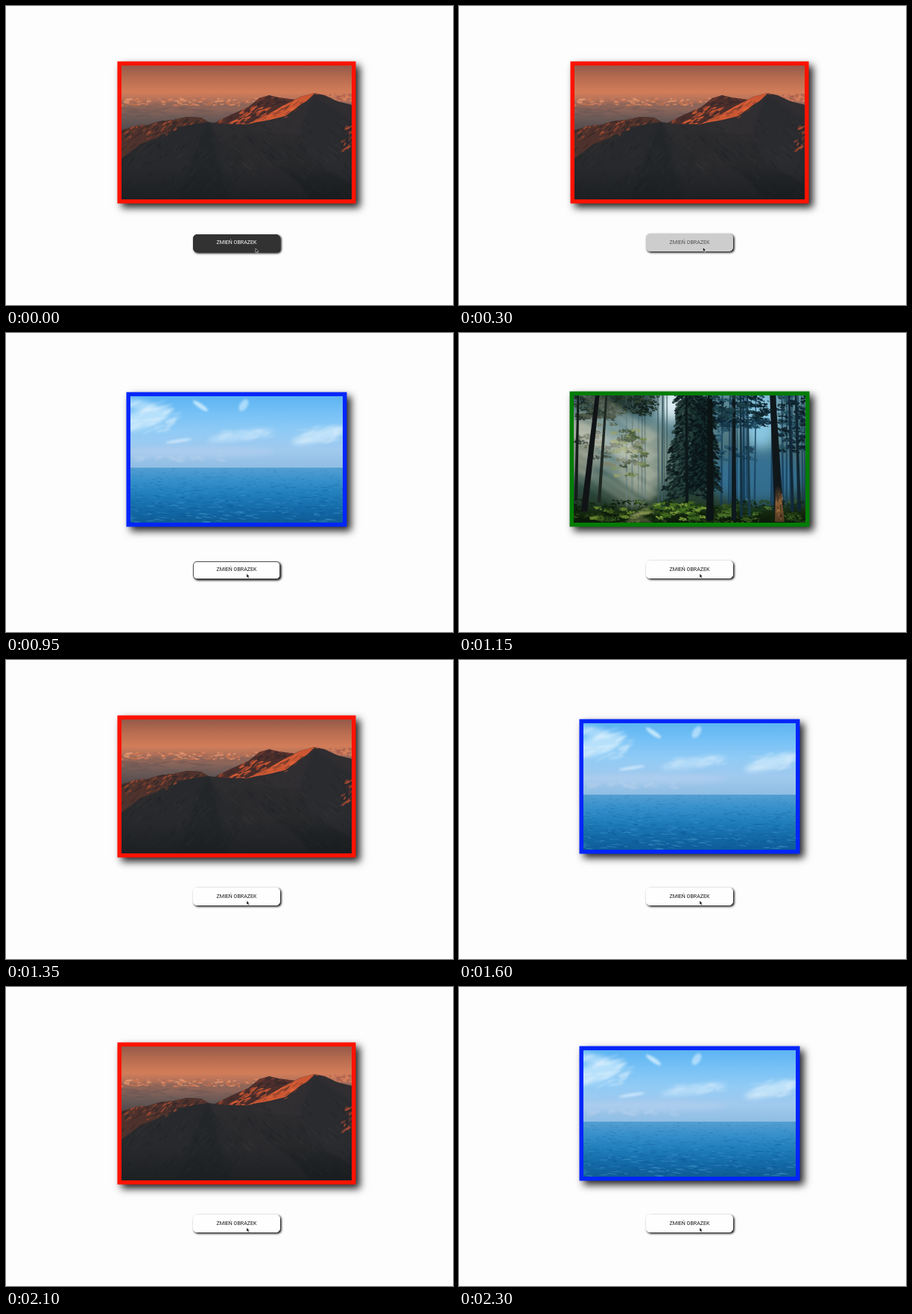
An HTML page with a canvas for the animation above (2.35 s loop, 600 by 402 pixels).

```html
<!DOCTYPE html>
<html lang="pl">
<head>
<meta charset="utf-8">
<title>Zmień obrazek</title>
<style>
html, body { margin: 0; width: 100%; height: 100%; overflow: hidden; background: #fefdfe; }
canvas { position: absolute; visibility: hidden; box-shadow: 0 0 0 5.5px, 5px 5px 10px 5.5px #000d; }
#red { left: 155px; top: 80px; color: #fe1300; }
#blue { left: 167px; top: 85px; color: #0326fa; }
#green { left: 154px; top: 84px; color: #047c07; }
#button {
  position: absolute; box-sizing: border-box; left: 251px; width: 117px; height: 24px;
  border: 1px solid; border-radius: 5px; box-shadow: 1.5px 1.5px 3px #000;
}
#label {
  position: absolute; left: 209.5px; top: 311px; width: 200px; text-align: center;
  font: 7.05px/14px Roboto, Arial, sans-serif;
}
#cursor { position: absolute; left: 0; top: 0; }
</style>
</head>
<body>
<canvas id="red" width="309" height="180"></canvas>
<canvas id="blue" width="285" height="170"></canvas>
<canvas id="green" width="311" height="171"></canvas>
<div id="button"></div>
<div id="label">ZMIEŃ OBRAZEK</div>
<svg id="cursor" width="8" height="10" viewBox="-1 -1 8 10">
  <path d="M0 0V5.6L1.3 4.5L2.3 6.7L3.3 6.2L2.3 4.1H4Z" fill="#111" stroke="#fff" stroke-width=".5"/>
</svg>
<script>
const el = id => document.getElementById(id);
let c, seed;
const rnd = (a = 0, b = 1) => {
  seed = (seed * 16807) % 2147483647;
  return a + (b - a) * seed / 2147483647;
};

// Scenes are drawn in stage coordinates
function scene(id, x, y) {
  c = el(id).getContext('2d');
  c.translate(-x, -y);
  seed = 4711;
}
function fade(y0, y1, ...colors) {
  const g = c.createLinearGradient(0, y0, 0, y1);
  colors.forEach((k, i) => g.addColorStop(i / (colors.length - 1), k));
  return g;
}
function rect(x, y, w, h, fill) {
  c.fillStyle = fill;
  c.fillRect(x, y, w, h);
}
function poly(points, fill) {
  const path = new Path2D('M' + points + 'Z');
  c.fillStyle = fill;
  c.fill(path);
  return path;
}
function blob(x, y, rx, ry, fill, alpha = 1, turn = 0) {
  c.globalAlpha = alpha;
  c.fillStyle = fill;
  c.beginPath();
  c.ellipse(x, y, rx, ry, turn, 0, 7);
  c.fill();
  c.globalAlpha = 1;
}
function scatter(n, x, y, w, h, colors, rx, ry, alpha, turn = 0) {
  for (let i = 0; i < n; i++)
    blob(rnd(x, x + w), rnd(y, y + h), rnd(rx * .4, rx), rnd(ry * .4, ry),
      colors[i % colors.length], alpha, turn + rnd(-.25, .25));
}
function soft(px, draw) {
  c.filter = `blur(${px}px)`;
  draw();
  c.filter = 'none';
}

function mountains() {
  scene('red', 155, 80);
  rect(155, 80, 309, 180, fade(80, 170, '#95594a', '#b96d50', '#d27d59', '#9a6a5c', '#685956', '#4e474a'));
  soft(1.5, () => rect(150, 130, 320, 8, '#8d6558'));
  scatter(170, 155, 124, 185, 10, ['#d9805d', '#e89a70', '#a66b59', '#c1714f'], 4, 1.6, .65);
  scatter(30, 435, 119, 30, 9, ['#d9805d', '#a8604d'], 4, 2, .7);
  scatter(40, 155, 137, 150, 14, ['#775d58', '#5f5252'], 14, 1.5, .35);

  const back = poly('278 158L300 147L325 136L340 124L353 120L366 123L388 126L400 150L330 175', '#4b2e2b');
  c.save();
  c.clip(back);
  scatter(80, 285, 135, 70, 24, ['#d85c35', '#a8482f', '#3b292a'], 6, 1.3, .8, -.5);
  scatter(35, 335, 120, 52, 13, ['#33272a', '#6d392f'], 6, 1.6, .75, -.3);
  c.restore();

  const body = poly('155 167L175 161L190 160L206 155L225 153L243 149L262 150L272 156L295 159L322 159L345 149L370 135L395 122L414 117L428 120L444 128L464 133V260H155',
    fade(118, 260, '#352d2f', '#2d2c2f', '#26282a', '#1d2023'));
  c.save();
  c.clip(body);
  poly('320 160L345 149L370 135L397 121L414 117L420 119L396 132L375 148L350 154L337 156', '#cb5733');
  scatter(65, 330, 126, 75, 26, ['#ea683a', '#8b412f', '#4b302e'], 6, 1.1, .6, -.55);
  poly('414 118L398 133L377 150L345 157L330 166L470 185V132L442 126', '#302e31');
  poly('155 166L205 154L243 148L264 150L272 156L230 163L205 176L180 186L155 205', '#50322c');
  scatter(120, 155, 152, 108, 26, ['#b04e30', '#3a2828', '#75402f', '#29282a'], 5, 1.3, .75, -.65);
  poly('272 156L250 159L232 165L205 182L180 200L155 214V260H330', '#27292c');
  soft(2, () => {
    poly('272 158L255 190L230 260H300L285 205', '#232629');
    poly('325 165L345 200L390 235L410 260H300', '#2a2a2d');
    poly('414 120L395 165L410 210L464 240V155', '#2a2b2f');
  });
  scatter(210, 155, 175, 160, 85, ['#38363a', '#1b1e22', '#302f32'], 7, .8, .45, -.9);
  scatter(230, 295, 155, 169, 105, ['#3b3839', '#1d2024', '#303034'], 8, .9, .4, .75);
  scatter(30, 451, 162, 13, 32, ['#ad4c33', '#663a32', '#29272a'], 4, 1.4, .8, -.9);
  rect(155, 215, 309, 45, fade(215, 260, '#181b1e00', '#181b1eaa'));
  c.restore();
}

function sea() {
  scene('blue', 167, 85);
  rect(167, 85, 285, 97, fade(85, 182, '#5cb4f2', '#78c2f6', '#91cbf5', '#a1c9ee', '#8fbde3'));
  soft(3, () => {
    blob(185, 115, 38, 13, '#def3ff', .6, -.3);
    blob(180, 97, 25, 7, '#d8f0ff', .55, .2);
    blob(315, 138, 45, 6, '#c8e7fc', .6, -.15);
    blob(420, 138, 38, 8, '#d1ebfb', .7, -.25);
    blob(260, 160, 100, 7, '#b7d2ee', .5);
  });
  soft(1.4, () => {
    blob(261, 98, 12, 3, '#e2f5ff', .75, .6);
    blob(319, 97, 9, 5, '#d7f0ff', .6, -1);
    blob(232, 145, 18, 2, '#e2f2ff', .7, -.15);
    scatter(28, 167, 90, 65, 42, ['#eefaff'], 14, 2, .35, -.35);
    scatter(16, 290, 130, 65, 12, ['#e2f3ff'], 13, 1.5, .35, -.18);
    scatter(20, 395, 125, 55, 23, ['#e8f6ff'], 14, 1.6, .4, -.25);
    scatter(16, 170, 165, 120, 7, ['#c8daf0'], 9, 2, .45);
  });
  rect(167, 181, 285, 75, fade(181, 255, '#559fd2', '#358fca', '#207db9', '#146ba8', '#0e5c96'));
  for (let i = 0; i < 900; i++) {
    const d = rnd(), y = 182 + 74 * d;
    blob(rnd(165, 454), y, 2 + 6 * d * rnd(), .3 + .8 * d * rnd(),
      ['#0b5590', '#4a9fd3', '#1268a5'][i % 3], .2 + .25 * d, rnd(-.05, .18));
  }
}

function trunk(x0, x1, w, color, bottom = 252) {
  poly(`${x0 - w * .35} 82L${x0 + w * .35} 82L${x1 + w * .55} ${bottom}L${x1 - w * .55} ${bottom}`, color);
}
// Ragged clumps of small leaves
function leaves(n, x, y, w, h, colors, spread = 8) {
  for (let i = 0; i < n; i++)
    scatter(16, rnd(x, x + w) - spread, rnd(y, y + h) - spread / 3, spread * 2, spread * .7,
      [colors[i % colors.length]], 2.2, 1.2, .75, .3);
}
// Branches droop away from the trunk and leave gaps of light
function conifer(x, top, bottom, half, colors) {
  for (let y = top; y < bottom; y += 3.5) {
    const reach = half * (.55 + .45 * (y - top) / (bottom - top)) * rnd(.6, 1.1);
    for (const side of [-1, 1])
      for (let k = 0; k < 1; k += .05)
        blob(x + side * reach * k + rnd(-2, 2), y + 9 * k * k + rnd(-3, 3), rnd(1.5, 4), rnd(.7, 2),
          colors[Math.floor(rnd(0, colors.length))], .8, side * .55);
  }
}
function forest() {
  scene('green', 154, 84);
  rect(154, 84, 311, 172, fade(84, 256, '#5f8b98', '#557f8a', '#456a70', '#2b463c', '#15270f'));
  soft(9, () => {
    blob(285, 95, 20, 24, '#e8f8fc', .95);
    blob(405, 115, 24, 45, '#8fd0ec', .9);
    blob(400, 195, 65, 35, '#34749c', .85);
    blob(250, 170, 38, 48, '#909d8e', .85);
    blob(165, 150, 25, 45, '#a19e88', .7);
    blob(210, 90, 55, 18, '#1c2c25', .9);
  });
  for (let i = 0; i < 30; i++) {
    const left = i < 11, x = left ? rnd(222, 288) : rnd(345, 465);
    trunk(x, x + rnd(-2, 2), rnd(1, 3), left ? '#3c5c61aa' : '#153a57bb', rnd(222, 245));
  }
  leaves(75, 160, 84, 105, 30, ['#111d19', '#1b2b21', '#33442f', '#16251f']);
  leaves(40, 154, 110, 90, 70, ['#1a2720', '#33422d', '#5e6249'], 6);
  leaves(42, 205, 130, 45, 62, ['#2f4722', '#5c7535', '#1d3019', '#76874a'], 5);
  leaves(75, 345, 84, 68, 42, ['#0f2a3a', '#1b4456', '#0d222c'], 7);
  leaves(24, 345, 120, 55, 50, ['#15394f', '#27566d'], 6);
  leaves(65, 430, 84, 35, 75, ['#0f2633', '#24505f', '#0c1d26'], 6);

  soft(2.5, () => {
    for (let i = 0; i < 10; i++) {
      const y = 88 + i * 13;
      poly(`154 ${y - 10}L200 ${y}L268 ${y + 50}L255 ${y + 60}`, i % 2 ? '#efecd414' : '#f3efda38');
    }
    poly('154 116L195 132L245 158L225 170L154 141', '#f4f2e250');
  });
  conifer(308, 80, 218, 34, ['#0e1b1d', '#152c2a', '#0a1517', '#29443f']);
  conifer(330, 88, 205, 22, ['#0c191c', '#16302f', '#0a1416']);
  trunk(305, 306, 4, '#0d181a', 230);

  rect(154, 230, 311, 26, fade(230, 256, '#14270f00', '#13250d', '#0b170a'));
  leaves(90, 154, 226, 311, 30, ['#132710', '#28431a', '#0c190b', '#3b5a20']);
  leaves(48, 265, 228, 62, 22, ['#476f22', '#7a9a3a', '#1f3c16', '#3a631e'], 5);
  leaves(26, 180, 234, 75, 16, ['#66832f', '#1f3616', '#45621f'], 5);
  leaves(16, 345, 234, 75, 12, ['#4b732b', '#1a381c'], 5);
  soft(1, () => {
    poly('250 234L258 237L242 245L262 255H224L231 245', '#9a986b66');
    blob(246, 243, 17, 2, '#a8b06e', .6, -.15);
  });

  trunk(186, 168, 8, '#111416', 240);
  trunk(198, 188, 4, '#1f2722', 228);
  trunk(160, 157, 4, '#151e1a', 225);
  trunk(337, 337, 9, '#0b1315');
  trunk(369, 369, 6, '#0d191e');
  trunk(378, 379, 3, '#123040', 248);
  trunk(387, 390, 3, '#18394a', 246);
  trunk(443, 448, 4, '#12293a', 240);
  trunk(452, 457, 4, '#102531', 240);
  trunk(421, 430, 11, '#10171b');
  poly('425 205L431 205L437 254H424', fade(205, 254, '#80593900', '#835a34', '#4c3720'));
  scatter(30, 426, 215, 8, 36, ['#a9743f', '#2a2019'], 1.2, 3, .6);
  leaves(28, 342, 84, 72, 30, ['#0f252d', '#1f414a'], 6);
}

mountains();
sea();
forest();

const order = ['red', 'blue', 'green'];
const clicks = [600, 1000, 1250, 1500, 1700, 1950, 2200];
const mix = (a, b, k) => a + (b - a) * k;
const ease = (t, a, b) => {
  const k = Math.min(1, Math.max(0, (t - a) / (b - a)));
  return k * k * (3 - 2 * k);
};
const gray = v => `rgb(${v},${v},${v})`;
const start = performance.now();

function draw() {
  const t = (performance.now() - start) % 2350;
  const shown = order[clicks.filter(k => t >= k).length % 3];
  for (const id of order) el(id).style.visibility = id === shown ? 'visible' : 'hidden';

  const hover = ease(t, 90, 400);
  const pressed = clicks.some(k => t >= k - 80 && t < k);
  const face = mix(50, 254, hover);
  const button = el('button').style;
  button.background = gray(face);
  button.borderColor = pressed ? '#555' : gray(face);
  button.top = (pressed || t < 100 ? 307 : 306) + 'px';
  el('label').style.color = gray(mix(255, 25, hover));

  const move = ease(t, 90, 450);
  el('cursor').style.transform = `translate(${mix(334, 322, move)}px, ${mix(325, 322.5, move)}px)`;
  requestAnimationFrame(draw);
}
draw();
</script>
</body>
</html>
```
